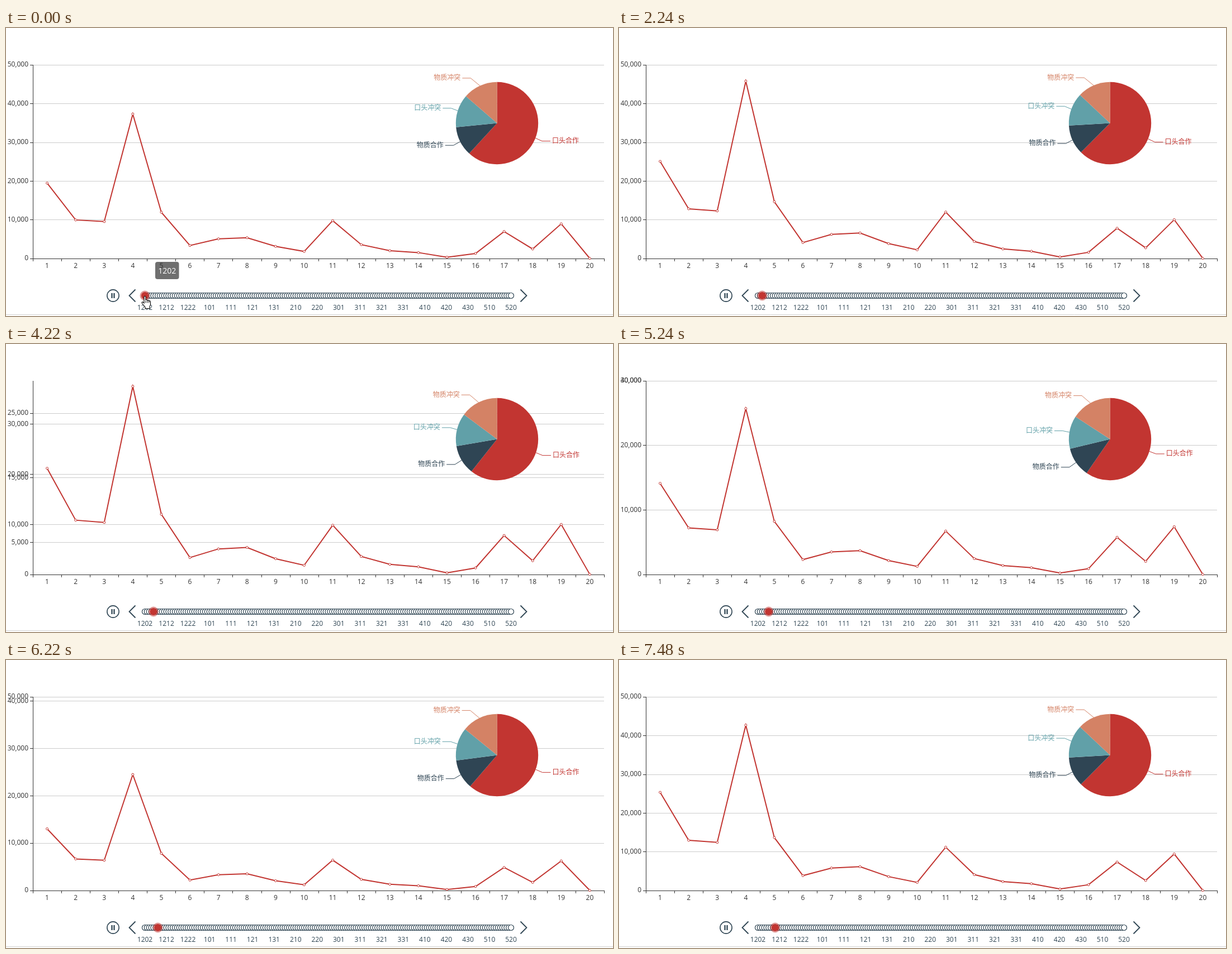
These frames come from a looping animation (1086 px wide and 516 px high, 8000 ms). An HTML page with a canvas:

```html
<!DOCTYPE html>
<html lang="zh">
<head>
<meta charset="utf-8">
<style>
html, body { margin: 0; width: 100%; height: 100%; overflow: hidden; background: #fff; }
canvas { display: block; }
</style>
</head>
<body>
<canvas id="stage" width="1086" height="516"></canvas>
<script>
const ctx = document.getElementById('stage').getContext('2d');
const LOOP = 8000, STEP = 300, DELAY = 10;
const LEFT = 48, RIGHT = 1070, BASE = 413, HEIGHT = 347, SLOT = 51.1;
const RED = '#c23531', INK = '#304654', AXIS = '#333';
const LATIN = '"Open Sans", "Noto Sans", sans-serif';
const CJK = '12px "Noto Sans CJK SC", "Noto Sans CJK", sans-serif';
const SLICES = [[RED, '口头合作'], ['#2f4554', '物质合作'], ['#61a0a8', '口头冲突'], ['#d48265', '物质冲突']];

const lerp = (a, b, p) => a + (b - a) * p;
const mix = (a, b, p) => a.map((v, i) => lerp(v, b[i], p));
const cubicOut = k => 1 - (1 - k) ** 3;
const quintInOut = k => k < .5 ? 16 * k ** 5 : 1 - 16 * (1 - k) ** 5;
const clamp = k => Math.max(0, Math.min(1, k));
const crisp = v => (Math.round(2 * v) | 1) / 2;

// Every day has the same profile relative to its peak, with a heavier or lighter start and end
const PROFILE = [.555, .284, .272, 1, .32, .09, .136, .144, .084, .049,
  .262, .096, .054, .041, .009, .035, .187, .066, .24, .001];

// Axis maximum and peak in thousands, weight of start and end, pie angle of the red slice
function day(max, peak, lead, tail, red) {
  const weight = i => i < 3 ? lead : i > 15 ? tail : 1;
  return {
    max,
    bars: PROFILE.map((share, i) => HEIGHT * peak / max * share * weight(i)),
    cuts: [0, red, red + 41.8, red + 88.4, 360]
  };
}

const days = [
  day(50, 37.3, .94, 1, 222.5),
  day(50, 41.8, .96, .95, 223.9),
  day(50, 46.3, .98, .9, 225.2),
  day(50, 41.5, 1.05, 1.03, 222),
  day(40, 39.4, 1.02, 1.1, 218.8),
  day(30, 25.7, .99, 1.2, 214.6),
  day(40, 23, .95, 1.08, 220.3),
  day(50, 40, 1.01, .96, 224.4),
  day(50, 42.7, 1.07, .92, 224.9)
];
const starts = [258, 1250, 2220, 3224, 4200, 5231, 6200, 7220];

function path(points, color, width) {
  ctx.beginPath();
  points.forEach(([x, y]) => ctx.lineTo(x, y));
  ctx.strokeStyle = color;
  ctx.lineWidth = width;
  ctx.stroke();
}

function disc(x, y, r, fill, stroke, width) {
  ctx.beginPath();
  ctx.arc(x, y, r, 0, 7);
  ctx.fillStyle = fill;
  ctx.fill();
  ctx.strokeStyle = stroke;
  ctx.lineWidth = width;
  ctx.stroke();
}

function text(str, x, y, color, align = 'center', font = '12px ' + LATIN) {
  ctx.font = font;
  ctx.fillStyle = color;
  ctx.textAlign = align;
  ctx.fillText(str, x, y);
}

function ticksOf(max) {
  const step = max === 30 ? 5 : 10;
  return Array.from({ length: max / step + 1 }, (_, i) => i * step);
}

// Shared ticks slide to the new scale, new ones stand at once
function drawAxes(from, to, p) {
  const old = ticksOf(from.max);
  const rows = ticksOf(to.max).map(v => {
    const max = old.includes(v) ? from.max : to.max;
    return [v, BASE - HEIGHT * lerp(v / max, v / to.max, p)];
  });
  for (const [v, y] of rows) {
    if (v) path([[LEFT, crisp(y)], [RIGHT, crisp(y)]], '#ccc', 1);
  }
  for (const [v, y] of rows) {
    path([[LEFT - 5, crisp(y)], [LEFT, crisp(y)]], AXIS, 1);
    text(v ? v + ',000' : '0', 40, Math.round(y + 3.4), AXIS, 'right');
  }
  path([[48.5, 66], [48.5, 414]], AXIS, 1);
  path([[LEFT, 413.5], [RIGHT, 413.5]], AXIS, 1);
  for (let i = 0; i <= 20; i++) {
    const x = crisp(LEFT + SLOT * i);
    path([[x, 413], [x, 418]], AXIS, 1);
    if (i < 20) text(i + 1, LEFT + SLOT * (i + .5), 430, AXIS);
  }
}

function drawLine(bars) {
  const points = bars.map((h, i) => [LEFT + SLOT * (i + .5), BASE - h]);
  path(points, RED, 2);
  for (const [x, y] of points) disc(x, y, 2, '#fff', RED, 1);
}

function drawPie(cuts) {
  const cx = 878.5, cy = 170.5, r = 73.7;
  const rad = deg => (deg - 90) * Math.PI / 180;
  SLICES.forEach(([color, name], i) => {
    const a = rad(cuts[i]), b = rad(cuts[i + 1]), mid = (a + b) / 2;
    ctx.beginPath();
    ctx.moveTo(cx, cy);
    ctx.arc(cx, cy, r, a, b);
    ctx.fillStyle = color;
    ctx.fill();
    const dir = Math.cos(mid) < 0 ? -1 : 1;
    const dy = Math.sin(mid) * (r + 15), y = cy + dy;
    const x = cx + dir * Math.sqrt((r + 30) ** 2 - dy * dy);
    path([[cx + Math.cos(mid) * r, cy + Math.sin(mid) * r], [x - dir * 18, y], [x - dir * 3, y]], color, 1);
    ctx.textBaseline = 'middle';
    text(name, x, y - 1, color, dir < 0 ? 'right' : 'left', CJK);
    ctx.textBaseline = 'alphabetic';
  });
}

function dateLabel(n) {
  const date = new Date(2019, 11, 2 + n);
  return (date.getMonth() + 1) * 100 + date.getDate();
}

function drawTimeline(pos) {
  const y = 479.5, x = i => 248.5 + 3.853 * i;
  disc(191.5, y, 10.6, '#fff', INK, 1.6);
  ctx.fillStyle = INK;
  for (const dx of [-2, 2]) ctx.fillRect(191.5 + dx - 1.15, y - 4.5, 2.3, 9);
  for (const [tip, back] of [[220.5, 231.5], [931.5, 920.5]])
    path([[back, y - 11], [tip, y], [back, y + 11]], INK, 1.8);
  for (let i = 0; i <= 170; i++) {
    disc(x(i), y, 5, '#fff', INK, 1.2);
    if (i % 10 === 0) text(dateLabel(i), x(i), 505, INK);
  }
  disc(x(pos), y, 6.5, RED, 'rgba(194,53,49,.5)', 5);
}

function drawTooltip() {
  ctx.fillStyle = 'rgba(50,50,50,.7)';
  ctx.beginPath();
  ctx.roundRect(267, 419, 42.5, 31, 4);
  ctx.fill();
  text(dateLabel(0), 288.2, 440, '#fff', 'center', '14px ' + LATIN);
}

const hand = new Path2D('M4.5 13V2Q4.5.5 6 .5T7.5 2V8Q7.5 6.7 9 6.7T10.5 8V9Q10.5 7.6 12 7.6T13.4 9' +
  'V10Q13.4 8.8 14.6 8.8T16 10.3V15Q16 17 14.5 19V22.5H6.5V20Q4 17 1 13.5Q0 11.5 1.2 11T4.5 13Z');

function drawHand(dy) {
  ctx.save();
  ctx.translate(242.5, 480 + dy);
  ctx.fillStyle = '#fff';
  ctx.fill(hand);
  ctx.strokeStyle = '#000';
  ctx.lineWidth = 1.1;
  ctx.stroke(hand);
  for (const x of [7.5, 10.5, 13.4]) path([[x, 9], [x, 12.5]], '#000', 1);
  ctx.restore();
}

function draw(t) {
  const i = Math.max(0, starts.filter(s => s <= t).length - 1);
  const k = clamp((t - starts[i] - DELAY) / STEP), p = cubicOut(k);
  const from = days[i], to = t < starts[i] ? from : days[i + 1];
  ctx.fillStyle = '#fff';
  ctx.fillRect(0, 0, 1086, 516);
  path([[0, 513.5], [1086, 513.5]], '#d3d3d3', 1);
  drawAxes(from, to, p);
  drawLine(mix(from.bars, to.bars, p));
  drawPie(mix(from.cuts, to.cuts, p));
  drawTimeline(i + quintInOut(k));
  if (t < 150) drawTooltip();
  if (t < 230) drawHand(40 * clamp((t - 25) / 200) ** 2);
}

function tick() {
  draw(performance.now() % LOOP);
  requestAnimationFrame(tick);
}
tick();
</script>
</body>
</html>
```
